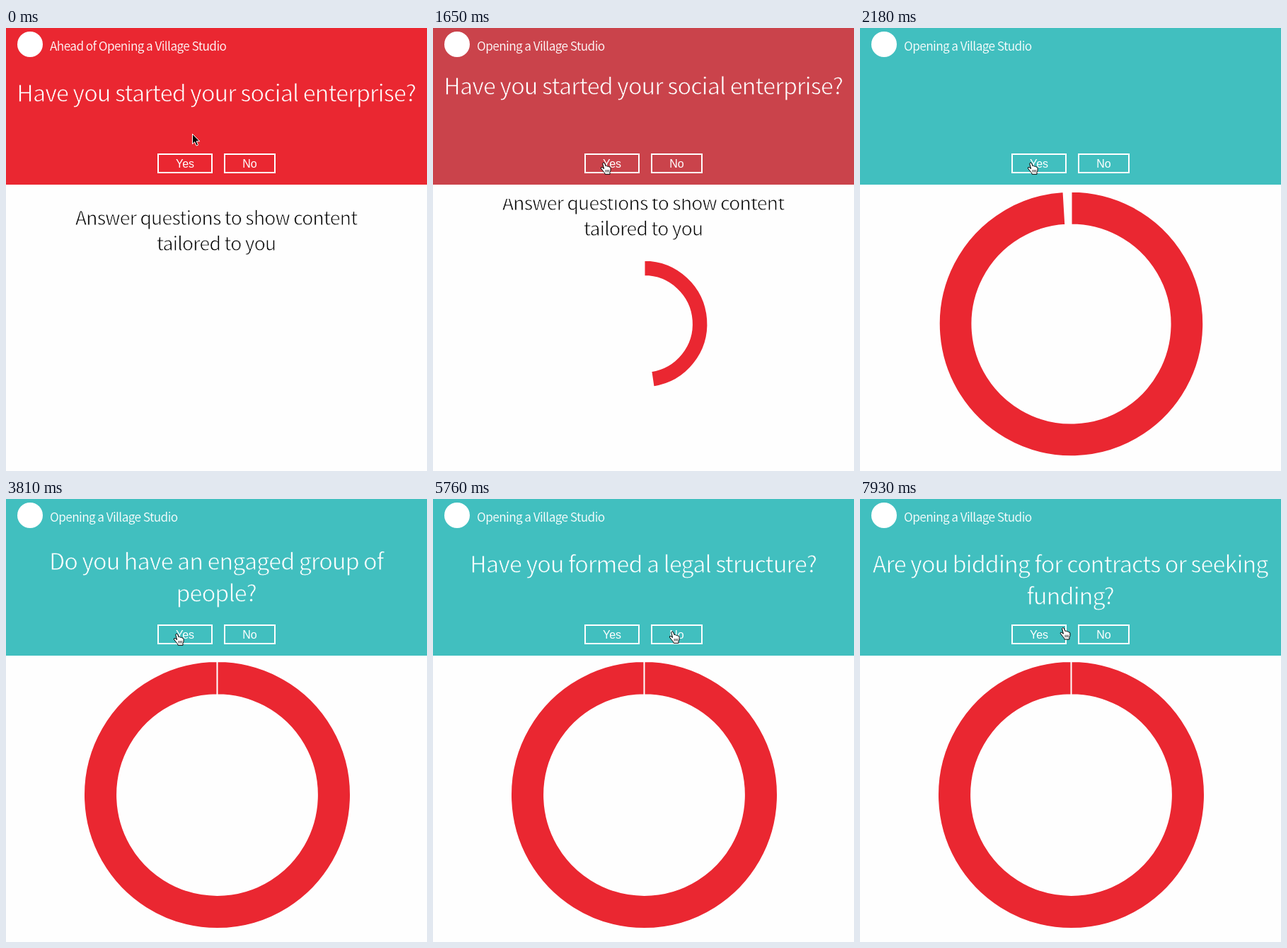
An HTML page that plays this animation: 595x625 px, repeating every 7990 ms.

```html
<!DOCTYPE html>
<html lang="en">
<head>
<meta charset="utf-8">
<style>
  html, body { margin: 0; width: 100%; height: 100%; overflow: hidden; background: #fefefe; }
  svg { display: block; width: 595px; height: 625px; }
  text { font-family: "Noto Sans CJK JP", "Noto Sans CJK SC", "Noto Sans CJK", "Open Sans", sans-serif; letter-spacing: -.028em; }
  .mid { text-anchor: middle; }
  /* A stroke in the background colour thins the regular face. */
  .heading { font-size: 32.35px; fill: #fff; stroke-width: .8px; }
  .sub { font-size: 26.5px; fill: #000; stroke: #fefefe; stroke-width: .8px; }
  .title { font-size: 17.2px; fill: #fff; letter-spacing: -.035em; stroke-width: .15px; }
  .button text { font: 16px "Liberation Sans", Arial, sans-serif; letter-spacing: 0; fill: #fff; }
  .button rect { fill: none; stroke: #fff; stroke-width: 2; }
</style>
</head>
<body>
<svg viewBox="0 0 595 625">
  <defs>
    <clipPath id="headClip"><rect y="60" width="595" height="161"/></clipPath>
    <clipPath id="subClip"><rect y="241" width="595" height="384"/></clipPath>
  </defs>
  <rect width="595" height="625" fill="#fefefe"/>
  <path id="ring" fill="#ea2731" stroke="#fff" stroke-width="2"/>
  <g clip-path="url(#subClip)">
    <g id="sub">
      <text class="sub mid" x="297.2" y="278">Answer questions to show content</text>
      <text class="sub mid" x="297.2" y="314">tailored to you</text>
    </g>
  </g>
  <rect id="header" width="595" height="221"/>
  <circle cx="34" cy="23" r="18" fill="#fff"/>
  <text id="title" class="title" x="62" y="32"></text>
  <g id="questions" clip-path="url(#headClip)"></g>
  <g class="button">
    <rect x="215" y="178" width="76" height="26"/>
    <text class="mid" x="253" y="197">Yes</text>
    <rect x="309" y="178" width="71" height="26"/>
    <text class="mid" x="344.5" y="197">No</text>
  </g>
  <path id="arrow" d="M0 0V14.2L3.2 11.2 5.6 16.6 8 15.6 5.7 10.3H10.2Z" fill="#000" stroke="#fff"/>
  <g id="hand" stroke="#000" stroke-linejoin="round">
    <path fill="#fff" d="M-1.3 1.6Q0-.6 1.5 1.2L3 5.2Q4.6 4.2 5.4 5.8 7 5 7.8 6.6 9.6 6.2 10 8 10.6 11.5 9 14.2V16.8H2.2L1.7 15.2Q-.6 12.4-3.6 8.6-4 6.6-2 7L.6 9Z"/>
    <path fill="none" stroke-width=".8" d="M3.2 10.5V14M5.3 10.5V14M7.3 10.5V14"/>
  </g>
</svg>
<script>
const LOOP = 7990, SLIDE = 515, FADE_DELAY = 745, FADE = 400;
const RED = [234, 39, 49], TEAL = [65, 191, 191];
const CLICKS = [1505, 3742, 6230];

// Moving stretches: first step, last step, number of steps.
const SPANS = [
  [60, 730, 11], [1510, 1650, 3], [1740, 2260, 7], [2320, 2670, 5], [3810, 4280, 9],
  [4520, 4870, 7], [5290, 5760, 9], [6240, 7000, 13], [7060, 7340, 6], [7760, 7930, 4]
];

const QUESTIONS = [
  ["Have you started your social enterprise?"],
  ["Do you have an engaged group of", "people?"],
  ["Have you formed a legal structure?"],
  ["Are you bidding for contracts or seeking", "funding?"]
];

// Pointer moves: start, end, from, to.
const MOVES = [
  [20, 730, [263.5, 149.5], [241, 189.5]],
  [5240, 5760, [241, 189.5], [338, 186.5]],
  [7710, 7960, [338, 186.5], [285, 181]]
];

const $ = id => document.getElementById(id);
const clamp = u => Math.min(1, Math.max(0, u));
const swing = u => .5 - Math.cos(Math.PI * clamp(u)) / 2;
const outQuart = u => 1 - (1 - clamp(u)) ** 4;
const mix = (a, b, k) => a.map((v, i) => v + (b[i] - v) * k);
const shift = (el, x, y) => el.setAttribute("transform", `translate(${x} ${y})`);
const show = (el, on) => el.setAttribute("visibility", on ? "visible" : "hidden");

function svg(name, parent, attrs) {
  const el = document.createElementNS("http://www.w3.org/2000/svg", name);
  for (const key in attrs) el.setAttribute(key, attrs[key]);
  return parent.appendChild(el);
}

const questions = QUESTIONS.map(lines => {
  const group = svg("g", $("questions"), {});
  lines.forEach((line, i) => {
    svg("text", group, { class: "heading mid", x: 297.2, y: 104 + 45 * i }).textContent = line;
  });
  return group;
});

// Holds the time at the start of the current step.
function snap(t) {
  for (const [start, end, count] of SPANS) {
    const step = (end - start) / (count - 1);
    if (t >= start && t < end + step) {
      return start + Math.min(count - 1, Math.floor((t - start) / step + .02)) * step;
    }
  }
  return t;
}

function ringPath(k) {
  const cx = 298.5, cy = 417.5, R = 188.5 * k, r = R * .75;
  const end = Math.min(k, .99999) * 2 * Math.PI, large = end > Math.PI ? 1 : 0;
  const at = (radius, a) => `${cx + radius * Math.sin(a)} ${cy - radius * Math.cos(a)}`;
  return `M${at(R, 0)}A${R} ${R} 0 ${large} 1 ${at(R, end)}` +
    `L${at(r, end)}A${r} ${r} 0 ${large} 0 ${at(r, 0)}Z`;
}

function drawPointer(t) {
  let pos = MOVES[0][2];
  for (const [start, end, from, to] of MOVES) {
    if (t >= start) pos = mix(from, to, swing((t - start) / (end - start)));
  }
  const [x, y] = pos;
  const over = y > 177 && y < 205 && (x > 214 && x < 292 || x > 308 && x < 381);
  show($("hand"), over);
  show($("arrow"), !over);
  shift(over ? $("hand") : $("arrow"), x, y);
}

function draw(time) {
  const t = snap(time);
  const started = t >= CLICKS[0];
  const color = `rgb(${mix(RED, TEAL, swing((t - CLICKS[0]) / 510)).map(Math.round)})`;
  $("header").setAttribute("fill", color);
  $("title").setAttribute("stroke", color);
  $("questions").setAttribute("stroke", color);
  $("title").textContent = started ? "Opening a Village Studio" : "Ahead of Opening a Village Studio";

  questions.forEach((group, i) => {
    const out = i < CLICKS.length ? swing((t - CLICKS[i]) / SLIDE) : 0;
    const opacity = i ? swing((t - CLICKS[i - 1] - FADE_DELAY) / FADE) : 1;
    shift(group, 0, -out * (QUESTIONS[i].length * 45 + 8));
    group.setAttribute("opacity", opacity);
    show(group, out < 1 && opacity > 0);
  });

  const away = swing((t - CLICKS[0]) / SLIDE);
  shift($("sub"), 0, -115 * away);
  show($("sub"), away < 1);

  const grown = outQuart((t - CLICKS[0]) / 970);
  show($("ring"), grown > 0);
  $("ring").setAttribute("d", ringPath(grown));
  drawPointer(t);
}

const origin = performance.now();
function tick() {
  draw((performance.now() - origin) % LOOP);
  requestAnimationFrame(tick);
}
tick();
</script>
</body>
</html>
```
